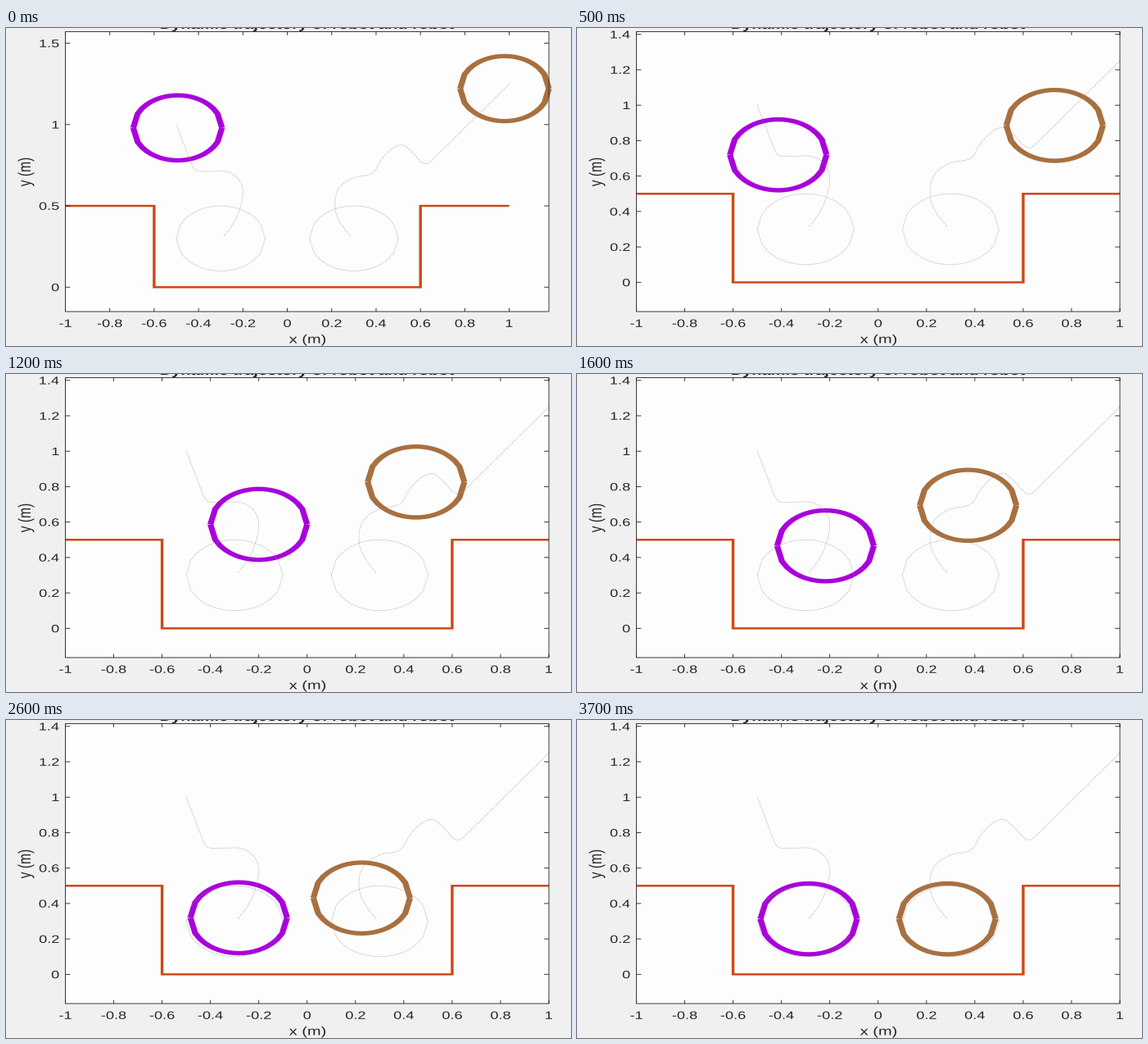
Write a matplotlib script that moves like this. It is 690 px wide and 388 px high and loops after 4100 ms.

```python
import numpy as np
import matplotlib.pyplot as plt
from matplotlib.animation import FuncAnimation
from matplotlib.patches import PathPatch, Polygon, Rectangle
from matplotlib.textpath import TextPath
from matplotlib.transforms import Affine2D

W, H, DPI = 690, 388, 100
STRETCH = 1.366                      # pixel aspect of the whole picture
LEFT, RIGHT, TOP, BOTTOM = 72.5, 663, 4.5, 346
RADIUS = 0.2
INK = "#262626"
PURPLE, BROWN, ORANGE, DOTS = "#a900dc", "#a87040", "#cd4915", "#8f8a8f"
TITLE = "Dynamic trajectory of robot and robot"


def spline(ctrl):
    """Quadratic B-spline that starts and ends on its outer control points."""
    p = np.array(ctrl)
    knots = np.vstack([p[:1], (p[1:-2] + p[2:-1]) / 2, p[-1:]])
    u = np.linspace(0, 1, 60)[:, None]
    return np.vstack([(1 - u) ** 2 * a + 2 * u * (1 - u) * b + u * u * c
                      for a, b, c in zip(knots, p[1:-1], knots[1:])])


class Mover:
    """A ring that brakes along a path; remaining distance is a square in time."""

    def __init__(self, color, ctrl, steps, roots):
        self.color, self.steps, self.roots = color, steps, roots
        self.path = spline(ctrl)
        self.s = np.r_[0, np.cumsum(np.hypot(*np.diff(self.path, axis=0).T))]

    def at(self, step):
        left_over = np.interp(step, self.steps, self.roots) ** 2
        s = self.s[-1] * (1 - left_over)
        return np.array([np.interp(s, self.s, c) for c in self.path.T])


left = Mover(
    PURPLE,
    [(-.5, 1), (-.44, .79), (-.42, .712), (-.36, .711), (-.26, .718),
     (-.2, .64), (-.2, .53), (-.24, .385), (-.287, .313)],
    [0, 28.7], [.988, 0])
right = Mover(
    BROWN,
    [(1, 1.25), (.665, .797), (.62, .742), (.565, .83), (.51, .893), (.425, .8),
     (.39, .69), (.3, .682), (.222, .61), (.21, .48), (.242, .38), (.286, .313)],
    [0, 9, 16, 37], [.988, .715, .567, 0])

GROUND = np.array([(-1, .5), (-.6, .5), (-.6, 0), (.6, 0), (.6, .5), (1, .5)])
arc_x = np.linspace(-RADIUS, RADIUS, 21)
arc_y = np.sqrt(np.maximum(RADIUS ** 2 - arc_x ** 2, 0))
HALVES = [np.column_stack([arc_x, k * arc_y]) for k in (1, -1)]

fig = plt.figure(figsize=(W / DPI, H / DPI), dpi=DPI, facecolor="#f0f0f0")
ax = fig.add_axes([0, 0, 1, 1])


def px(width):
    return width * 72 / DPI


def stroke(pts, width, color):
    """Mitred line whose thickness is stretched along with the picture."""
    p = pts / [STRETCH, 1]
    d = np.diff(p, axis=0)
    d /= np.hypot(*d.T)[:, None]
    n = np.column_stack([-d[:, 1], d[:, 0]])
    a, b = n[:-1], n[1:]
    mitre = (a + b) / (1 + (a * b).sum(1))[:, None]
    off = np.vstack([n[:1], mitre, n[-1:]]) * width / 2
    outline = np.vstack([p + off, (p - off)[::-1]]) * [STRETCH, 1]
    ax.add_patch(Polygon(outline, fc=color, lw=0, snap=False))


def dotted(pts):
    ax.plot(*pts.T, color=DOTS, lw=px(0.8), ls=(0, (1, 1.7)), dash_capstyle="butt")


def label(x, y, text, size, align=0.5, angle=0, weight="normal"):
    """Text with its baseline at y; align is 0 for left, 1 for right."""
    path = TextPath((0, 0), text, size=size,
                    prop=dict(family="Liberation Sans", weight=weight))
    box = path.get_extents()
    place = (Affine2D().translate(-box.x0 - align * box.width, 0)
             .rotate_deg(angle).scale(STRETCH, -1).translate(x, y))
    ax.add_patch(PathPatch(place.transform_path(path), fc=INK, lw=0))


def line(xs, ys):
    ax.plot(xs, ys, color=INK, lw=px(0.9), solid_capstyle="butt", snap=False)


def draw(step):
    ax.clear()
    ax.set(xlim=(0, W), ylim=(H, 0))
    ax.axis("off")
    centers = [m.at(step) for m in (left, right)]

    # Equal-aspect limits that follow the right ring while it is outside.
    x_max = max(1, centers[1][0] + RADIUS)
    y_mid = max(1.25, centers[1][1] + RADIUS) / 2
    x_scale = (RIGHT - LEFT) / (x_max + 1)
    y_scale = x_scale / STRETCH
    y_span = (BOTTOM - TOP) / y_scale

    def to_px(pts):
        x, y = np.asarray(pts, float).T
        return np.column_stack([LEFT + (x + 1) * x_scale,
                                (TOP + BOTTOM) / 2 - (y - y_mid) * y_scale])

    ax.add_patch(Rectangle((LEFT, TOP), RIGHT - LEFT, BOTTOM - TOP, fc="#fdfdfd", lw=0))

    for m, cx in ((left, -.3), (right, .3)):
        dotted(to_px(m.path))
        for half in HALVES:
            dotted(to_px(half + [cx, .3]))
    stroke(to_px(GROUND), 2.5, ORANGE)

    line([LEFT, RIGHT, RIGHT, LEFT, LEFT], [TOP, TOP, BOTTOM, BOTTOM, TOP])
    tick = 4.3
    for v in np.arange(-5, int(x_max * 5 + 1e-6) + 1) / 5:
        x = to_px([(v, 0)])[0, 0]
        line([x, x], [BOTTOM, BOTTOM - tick])
        line([x, x], [TOP, TOP + tick])
        label(x, 364.8, f"{v:g}", 13.3)
    gap = 0.5 if y_span > 1.65 else 0.2
    for v in np.arange(int((y_mid + y_span / 2) / gap) + 1) * gap:
        y = to_px([(0, v)])[0, 1]
        line([LEFT, LEFT + tick * STRETCH], [y, y])
        line([RIGHT, RIGHT - tick * STRETCH], [y, y])
        label(64.5, y + 4.8, f"{v:g}", 13.3, align=1)

    label(368, 384.5, "x (m)", 14.67)
    label(30, 176, "y (m)", 15.6, angle=90)
    label(368, 1, TITLE, 14.67, weight="bold")

    for m, c in zip((left, right), centers):
        for half in HALVES:
            stroke(to_px(half + c), 5.33, m.color)
    return []


anim = FuncAnimation(fig, draw, frames=41, interval=100, init_func=lambda: [],
                     repeat=True, repeat_delay=0)
plt.show()
```
